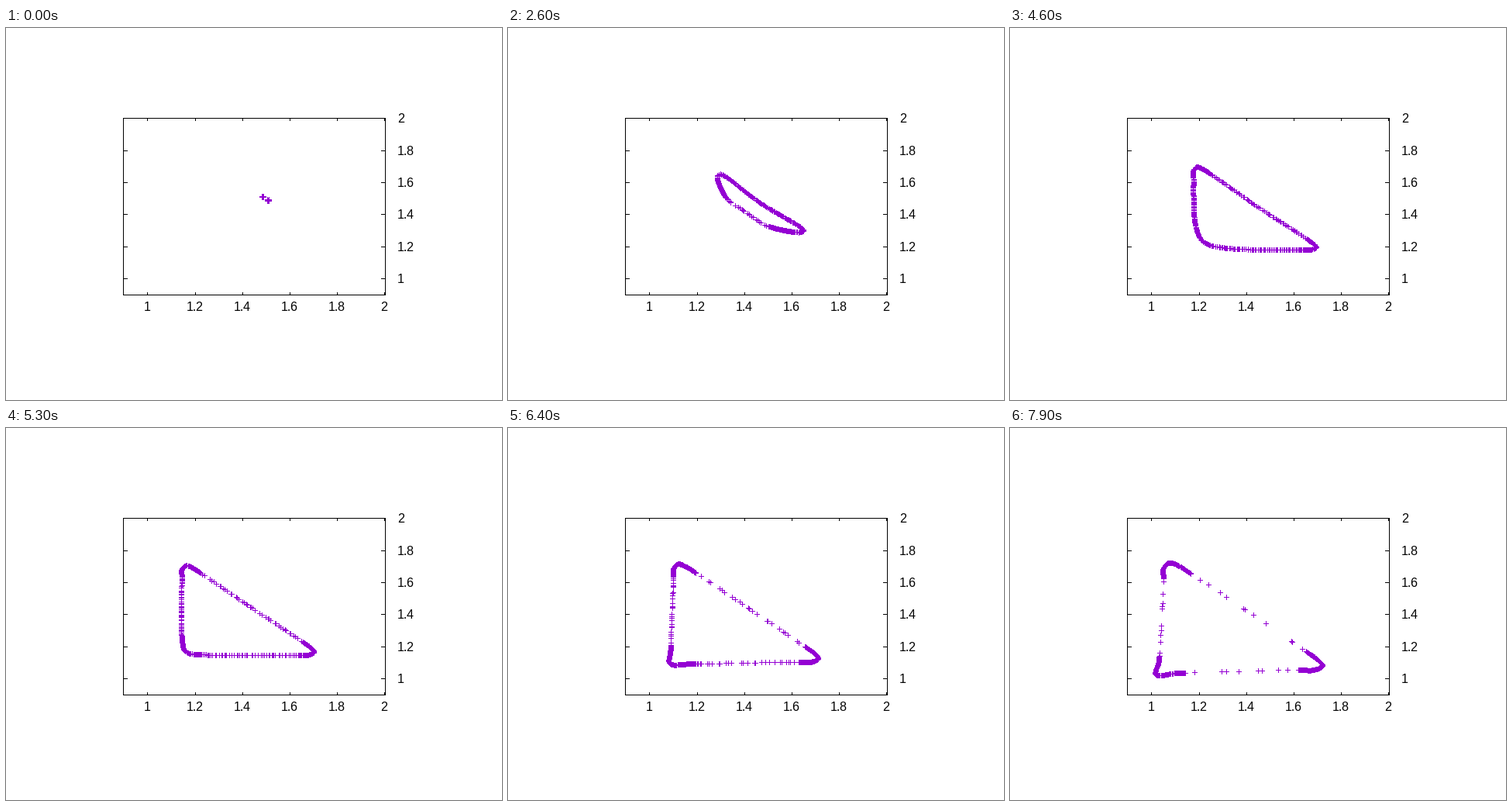
These frames come from a looping animation (640x480 px, 8000 ms). A matplotlib script:

```python
import numpy as np
import matplotlib.pyplot as plt
from matplotlib.animation import FuncAnimation

W, H, DPI = 640, 480, 100
PX = 72 / DPI
FRAMES, STEP = 80, 100
COUNT = 400
PURPLE = "#9400d3"

plt.rcParams.update({
    "path.simplify": False,
    "font.family": "Liberation Sans",
    "text.hinting": "default",
    "text.hinting_factor": 1,
})

rng = np.random.default_rng(12)
share = (np.arange(COUNT) + rng.uniform(-1, 1, COUNT)) / COUNT % 1
jitter = rng.uniform(-0.003, 0.003, (COUNT, 2))

# Knot positions along the loop where corners and edges meet.
BREAKS = [0, 1.08, 2, 4, 6, 8, 10, 12, 12.92, 14]


def rise(t, rate):
    return 1 - np.exp(-rate * t)


def half_loop(t):
    """Knots from the lower corner up the left side to the slope's middle."""
    left = 1.486 - 0.65 * rise(t, 0.139)
    top = 1.51 + 0.222 * rise(t, 0.39)
    low = 1.498 - 0.6 / (1 + (4.9 / max(t, 0.01)) ** 2.8)
    mid = 1.498 - 0.0108 * t
    s = 0.002 + 0.0042 * t  # size of the rounded top corner
    return np.array([
        (low, low),
        (left + 0.4 * (low - left) - 0.007, low + 0.09 * rise(t, 1)),
        (left, top - 2.9 * s),
        (left, top - s),
        (left + 0.75 * s, top),
        (left + 1.85 * s, top - 0.6 * s),
        (left + 3.3 * s, top - 1.95 * s),
        (mid, mid),
    ])


def hermite(knots, vals, at):
    """Smooth curve through vals at uneven knots."""
    slope = np.gradient(vals, knots, axis=0)
    i = np.clip(np.searchsorted(knots, at, side="right") - 1, 0, len(knots) - 2)
    h = (knots[i + 1] - knots[i])[:, None]
    s = (at - knots[i])[:, None] / h
    a, b = vals[i], vals[i + 1]
    return (a + (b - a) * s * s * (3 - 2 * s)
            + h * s * (1 - s) * ((1 - s) * slope[i] - s * slope[i + 1]))


def running(steps):
    return np.concatenate([[0], np.cumsum(steps)])


def loop_curve(half):
    """Mirror the half across x = y and close it."""
    ring = np.vstack([half, half[-2::-1, ::-1]])
    wrap = np.vstack([ring[-2], ring, ring[1]])
    knots = running(np.sqrt(np.hypot(*np.diff(wrap, axis=0).T)))
    index = np.linspace(0, len(ring) - 1, 561)
    at = np.interp(index + 1, np.arange(len(wrap)), knots)
    return index, hermite(knots, wrap, at)


def points(t):
    half = half_loop(t)
    index, curve = loop_curve(half)
    length = running(np.hypot(*np.diff(curve, axis=0).T))

    # Points drain from the edges into the three corners.
    on_edge = 0.85 / (1 + (t / 5) ** 5)
    c = (1 - on_edge) / 2
    cuts = np.array([0, c, 1 - c, 1, 1 + c, 2 - c, 2, 2 + c, 3 - c, 3]) / 3
    where = np.interp(share, cuts, np.interp(BREAKS, index, length))
    xy = np.column_stack([np.interp(where, length, axis) for axis in curve.T])

    # At first they sit at the two ends, then spread over the loop.
    apex = half[4]
    upper = (xy[:, 0] < xy[:, 1])[:, None]
    start = np.where(upper, apex, apex[::-1]) + jitter
    return start + (xy - start) * min(t / 0.6, 1)


def to_pixels(xy):
    x = 151.5 + (xy[:, 0] - 0.9) * 306.4
    y = 116.5 + (2 - xy[:, 1]) * 207
    return np.floor(x) + 0.5, np.floor(y) + 0.5


def pluses(x, y, r=3.5):
    gap = np.full_like(x, np.nan)
    xs = np.column_stack([x - r, x + r, gap, x, x, gap])
    ys = np.column_stack([y, y, gap, y - r, y + r, gap])
    return xs.ravel(), ys.ravel()


fig = plt.figure(figsize=(W / DPI, H / DPI), dpi=DPI, facecolor="white")
ax = fig.add_axes([0, 0, 1, 1])
ax.set_xlim(0, W)
ax.set_ylim(H, 0)
ax.axis("off")


def pen(xs, ys, color):
    line, = ax.plot(xs, ys, color=color, lw=PX, antialiased=False,
                    solid_capstyle="butt", snap=False)
    return line


def stroke(x0, y0, x1, y1):
    pen([x0, x1], [y0, y1], "black")


def label(x, y, value, ha):
    ax.text(x, y, f"{value:g}", size=16 * PX, ha=ha, va="baseline")


marks = pen([], [], PURPLE)

L, R, T, B = 151.5, 489.5, 116.5, 344.5
for y in (T, B):
    stroke(L - 0.5, y, R + 0.5, y)
for x in (L, R):
    stroke(x, T - 0.5, x, B + 0.5)

for k in range(6):
    x = np.floor(182.9 + 61.2 * k) + 0.5
    stroke(x, T, x, T + 3.5)
    stroke(x, B, x, B - 3.5)
    label(x - 0.5, 365, 1 + 0.2 * k, "center")
    y = np.floor(116.6 + 41.4 * k) + 0.5
    stroke(L, y, L + 5.5, y)
    stroke(R, y, R - 5.5, y)
    label(505, y + 5.5, 2 - 0.2 * k, "left")


def draw(i):
    marks.set_data(*pluses(*to_pixels(points(i * STEP / 1000))))
    return [marks]


anim = FuncAnimation(fig, draw, frames=FRAMES, interval=STEP,
                     repeat=True, repeat_delay=0, blit=False)
plt.show()
```
